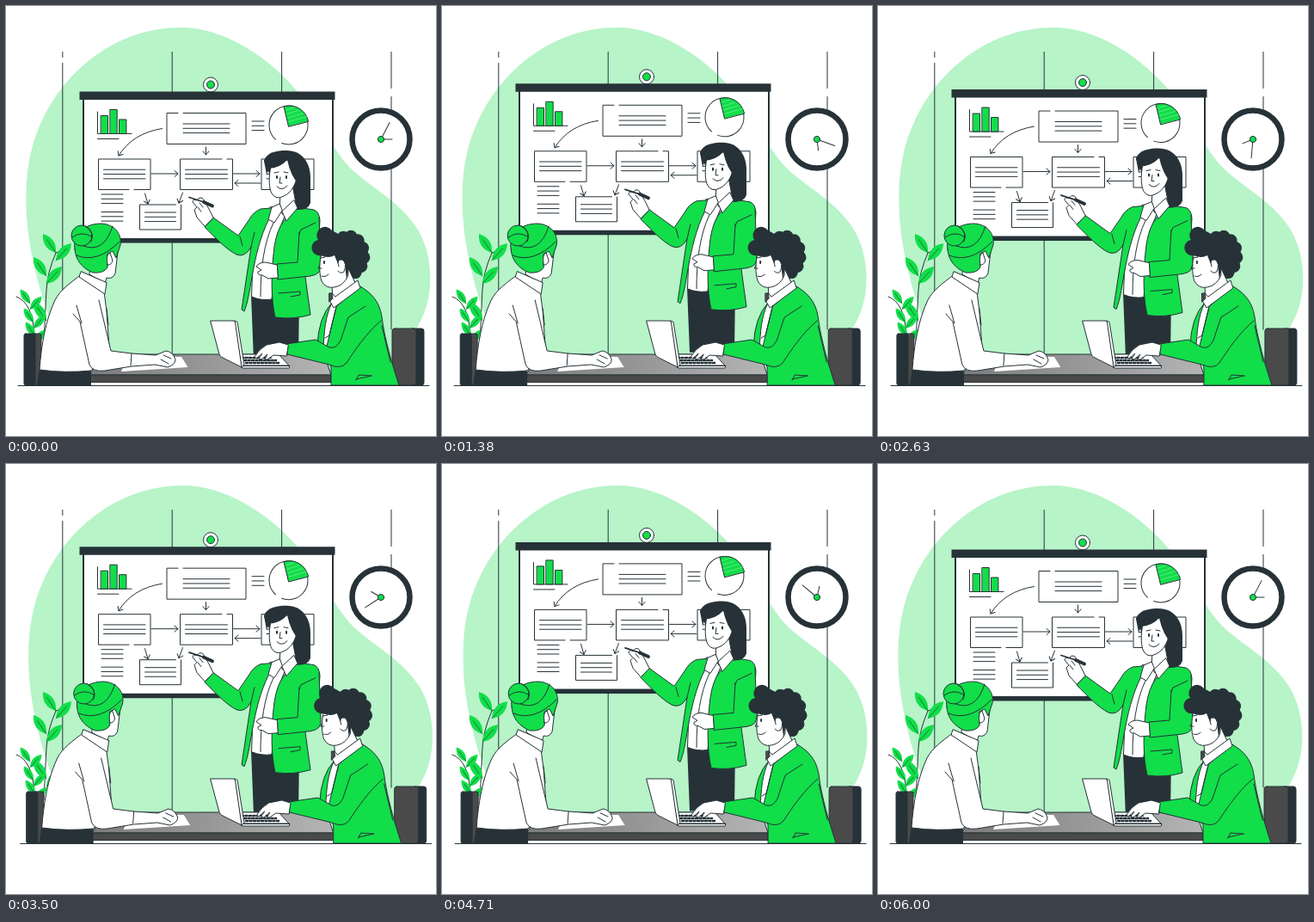
Animation of 500x500 px, one loop 6040 ms. Source, as an HTML page:

```html
<!DOCTYPE html>
<html lang="en">
<head>
<meta charset="utf-8">
<title>Team meeting</title>
<style>
html, body { margin: 0; width: 100%; height: 100%; overflow: hidden; background: #fff; }
svg { display: block; width: 100vw; height: 100vh; fill: none; stroke: #263238; stroke-width: 1; stroke-linejoin: round; stroke-linecap: round; }
.g { fill: #11de49; }
.w { fill: #fff; }
.d { fill: #263238; }
.k { fill: #4a4a4a; }
.n { stroke: none; }
</style>
</head>
<body>
<svg viewBox="0 0 500 500">
  <defs>
    <linearGradient id="top"><stop stop-color="#7c7c7c"/><stop offset="1" stop-color="#b4b4b4"/></linearGradient>
  </defs>

  <path class="sway n" fill="#b7f4c8" d="M203 25C250 25 300 55 335 95C362 127 378 165 400 188C425 212 460 228 480 262C497 292 497 335 484 362C474 385 455 405 440 430H90C60 400 35 330 26 265C20 215 24 170 42 133C70 73 130 25 203 25Z"/>
  <g id="wall"></g>

  <!-- clock -->
  <circle class="w" cx="436" cy="155" r="33.500" stroke-width="6.500"/>
  <path id="hands" d="M436 155L446 135.500M436 155H449"/>
  <circle class="g" cx="436" cy="155" r="3.600"/>

  <g id="float">
    <circle class="w" cx="238" cy="91.500" r="8.500"/>
    <circle class="g" cx="238" cy="91.500" r="4.500"/>
    <rect class="w" x="90" y="105" width="290" height="167" stroke-width="2"/>
    <path class="d n" d="M85.500 99.500H382.500V109H85.500ZM89 270H381V275.500H89Z"/>
    <g id="diagram"></g>

    <!-- presenter -->
    <path class="d n" d="M285 336H341L340 412H288Z"/>
    <path class="w" d="M307 234L296 262L287 298L285.500 338Q297 343 309 341L316 265L328 234Z"/>
    <path d="M311 252C300 275 296 304 296 338"/>
    <path class="g" d="M308 235L296 236Q287 240 283 248L270 267L241 246L231 257C243 269 256 283 268 289Q278 293 285 280L274 353L277 355C286 335 286 280 310 240Z"/>
    <path d="M285 280L289 263M272 268L275 279"/>
    <path class="g" d="M334 231L345 235L358 237Q364 239 365 249L363 285L348 315L354 359Q334 365 313 362C308 340 308 312 312 280Q315 260 323 250Z"/>
    <path d="M317 334L342 332V336L331 338"/>
    <path class="g" d="M341 263L339 298L315 300L316 318L354 314Q367 312 366 301L364 246"/>
    <path d="M341 265L343 260L360 252"/>
    <path class="w" d="M315 301L302 298Q294 298 291 303L297 307L293 309Q292 313 298 313L305 317L316 316Z"/>
    <path class="d n" d="M300 180C303 170 315 168 326 168C345 168 354 183 354 200V229Q351 238 338 237L308 200Z"/>
    <path class="w" d="M319 218L318 235L322 243L337 229L333 208Z"/>
    <path class="w" d="M308 186C305 200 306 213 309 218Q314 226 323 221C332 217 337 207 338 199L328 179Z"/>
    <path class="d n" d="M300 180C306 166 340 166 343 184L341 208Q331 198 327 179Q319 188 306 189L303 196Z"/>
    <path d="M312 194L317 193M323 193L328 194M319 199L318 206H321M315 210Q321 216 327 209"/>
    <path d="M315 198V200M326 198V200" stroke-width="2"/>
    <path class="w" d="M318 230L309 234L305 248L312 252L321 238ZM321 239L326 250L339 235L335 226Z"/>
    <path class="w" d="M231 256L222 246L219 237L222 234L217 228Q217 224 222 226L225 223Q229 222 231 227L236 236L241 246Z"/>
    <path d="M223 234L227 239M225 229L229 234"/>
    <path d="M213 222.500L230 228" stroke-width="1.800"/>
    <path d="M230 228L240 232.500" stroke-width="3.800"/>
  </g>

  <g id="plant"><path d="M58 287Q48 310 47 330T44 390M58 287L66 284M12 338Q32 345 33 386"/></g>

  <g class="sway">
    <!-- left chair, table -->
    <rect class="k" x="30" y="381" width="11" height="60" rx="2"/>
    <rect class="d" x="21" y="381" width="13" height="60" rx="2"/>
    <path fill="url(#top)" d="M112 405H370L378 429H98Z"/>
    <path class="k" d="M98 429H378V437.500H98Z"/>
    <path class="w n" d="M141 408H204L211.500 420L134 425Z"/>

    <!-- seated colleague, left -->
    <path class="d n" d="M39 420H99V441H36Z"/>
    <path class="w" d="M88 312C75 322 63 330 57 342C46 365 41 395 39 423Q68 427 99 424L120 396L117 355L114 332Z"/>
    <path class="w" d="M108 342L122 401L146 404L174 406L186 401Q194 402 197 411Q197 417 188 420L173 417L146 419L115 424Q101 426 97 417L86 367L78 358"/>
    <path d="M146 404L145 418M183 406L192 410M180 411L189 416M82 348L88 369M117 352L119 371"/>
    <path class="w" d="M98 302L97 312L115 323L117 316Q124 318 127 311L130 286L119 275Z"/>
    <path class="w" d="M87 309L85 315L115 335L117 322Z"/>
    <path class="g" d="M80 283C77 264 92 253 111 253C128 254 135 267 133 278L128 293L124 285L118 288V304Q114 311 101 310C89 305 81 296 80 283Z"/>
    <path class="w" d="M118 301Q116 288 121 287L124 296Q122 302 118 301Z"/>
    <circle class="g" cx="88" cy="267" r="12"/>
    <path d="M77 269Q88 261 99 268M92 256Q104 263 99 274M90 279Q114 288 124 256M82 290Q106 300 132 274"/>
  </g>

  <!-- laptop -->
  <path class="w" d="M272 405H317L329 418H276Z"/>
  <path d="M274 409H310M277 412H314M279 415H318" stroke-width="2.500" stroke-dasharray="2 2.500"/>
  <path class="w" d="M274 418.500H330L329 421H275Z"/>
  <path class="w" d="M266 366L269 367.500L277 417L274 420Z"/>
  <path class="w" d="M238 366H264Q266 366 266.500 368L274 420L252 409Q249 408 248 405Z"/>

  <g class="sway">
    <!-- right chair -->
    <rect class="d" x="470" y="375" width="16" height="66" rx="3"/>
    <rect class="k" x="449" y="375" width="28" height="66" rx="3"/>

    <!-- seated colleague, right -->
    <path class="g" d="M379 345Q363 362 362 396L380 403V350Z"/>
    <path class="w" d="M379 345C371 361 370 379 369 399L380 407L409 331Z"/>
    <path class="g" d="M412 326C425 334 434 343 437 361C440 387 449 416 457 441H378V420L371 404L380 366L384 350Z"/>
    <path class="g" d="M436 366C420 379 405 401 396 415Q389 423 376 417L327 405L326 393L360 388L376 397Q384 399 389 389L398 362L418 349"/>
    <path d="M407 435L410 429L425 430M437 372L447 414M407 434L425 430M384 350L376 383L371 386"/>
    <path class="w" d="M328 394L318 391L303 394Q294 399 289 408L291 410L298 404L294 410L297 411L304 405L301 411L304 411L311 406L326 407Z"/>
    <g id="curls" class="d n"><ellipse cx="398" cy="290" rx="23" ry="27"/></g>
    <path class="w" d="M379 323L380 346L409 328L398 305Z"/>
    <path class="w" d="M367 287C364 299 364 311 367 320Q372 329 382 327Q393 325 398 313L397 287Z"/>
    <path class="d n" d="M366 290A8.500 8.500 0 0 1 363 272A8.500 8.500 0 0 1 379 261L405 275L396 318L394 300H386L382 290Q375 294 366 290Z"/>
    <path class="w" d="M387 303Q384 294 391 295Q397 299 393 309Q389 312 386 308"/>
    <path d="M366 293L371 292M365 301L363 305H367M367 314Q371 316 375 312"/>
    <path d="M370 297V299" stroke-width="2"/>
    <path class="w" d="M379 334L376 342L381 351L412 328L409 319L383 338Z"/>
    <path class="k" d="M376 334H379L380 340L376 344Z"/>
    <path d="M14 441.500H492"/>
  </g>
</svg>
<script>
const LOOP = 6040, CYCLE = 6000;
const byId = id => document.getElementById(id);
const add = (id, html) => byId(id).insertAdjacentHTML("beforeend", html);
const line = (d, rest = "") => `<path d="${d}" ${rest}/>`;
const repeat = (n, f) => Array.from({ length: n }, (_, i) => f(i)).join("");

// Wall seams; the outer two are broken near the top.
add("wall", repeat(4, i => {
  const x = 65.8 + 127.4 * i;
  return line(`M${x} 53.5V${[375, 405, 101, 376][i]}`, i % 3 ? "" : `stroke-dasharray="${i ? "42 10" : "6 7"} 400"`);
}));

const rules = (x, y, w) => line(repeat(3, i => `M${x} ${y + 5.3 * i}h${w}`));

// A box with a gap in its outline, starting at gx on the top or bottom edge.
function card(x, y, w, h, gx, side = 1) {
  const [from, to] = side > 0 ? [y, y + h] : [y + h, y];
  const pad = w > 80 ? 19 : 6;
  return line(`M${gx + 6} ${from}H${x + w}V${to}H${x}V${from}H${gx}`) +
    rules(x + pad, y + h / 2 - 5.5, w - 2 * pad);
}

function head(x, y, angle) {
  return line("M-4 -3.5L0 0L-4 3.5", `transform="translate(${x} ${y}) rotate(${angle})"`);
}
function arrow(x, y, tx, ty) {
  return line(`M${x} ${y}L${tx} ${ty}`) + head(tx, ty, Math.atan2(ty - y, tx - x) * 180 / Math.PI);
}

add("diagram", [
  line("M106.5 123V148.500H146M106.500 154.500H131"),
  repeat(3, i => {
    const h = [21, 28, 16.5][i];
    return `<rect class="g" x="${110.5 + 10.7 * i}" y="${148.5 - h}" width="8" height="${h}"/>`;
  }),
  card(187, 124.5, 92, 36, 200),
  card(107.5, 178, 60.5, 35.5, 143, -1),
  card(202.5, 178, 61, 35.5, 251),
  card(297, 178, 61, 35.5, 303),
  card(155.5, 231, 48, 29, 197.5),
  rules(286, 134, 14), rules(111, 219, 25), rules(111, 239.5, 25),
  `<circle cx="328.500" cy="138.500" r="22.500" pathLength="100" stroke-dasharray="94 6" transform="rotate(132 328.500 138.500)"/>`,
  line("M328.5 140L323 117C337 113 349 122 351.500 134Z", 'class="g"'),
  line(repeat(4, i => `M${326 + i} ${121 + 4.5 * i}l${9 + 4 * i} ${-3 - i}`), 'stroke="#8ff0a8" stroke-width=".6"'),
  line("M181.5 142.500Q147 148 131 174"), head(131, 174, 122),
  arrow(232.5, 164, 232.5, 173), arrow(169, 195, 200, 195), arrow(264.5, 195, 295, 195),
  arrow(296, 206, 266, 206), arrow(161.5, 218, 165, 230), arrow(205.5, 217, 201, 229)
].join(""));

function leaf(x, y, dx, dy) {
  return line(`M${x} ${y}q${dx * .5 + dy * .4} ${dy * .5 - dx * .4} ${dx} ${dy}q${-dx * .5 - dy * .4} ${-dy * .5 + dx * .4} ${-dx} ${-dy}`, 'class="g n"') +
    line(`M${x} ${y}l${dx * .7} ${dy * .7}`, 'stroke-width=".6"');
}
// Each knot of a stem bears one leaf to the left and a lower one to the right.
function leaves(size, knots) {
  return knots.map(([x, y]) =>
    leaf(x, y, -15 * size, -22 * size) + leaf(x, y + 9 * size, 18 * size, -20 * size)).join("");
}
add("plant", leaves(1, [[58, 287], [47, 314], [47, 366]]) + leaves(.75, [[28, 346], [32, 368], [34, 384]]));

// Curls along the right-hand rim of the hair.
add("curls", repeat(8, i => {
  const a = -1.9 + i * .5;
  return `<circle cx="${398 + 18 * Math.cos(a)}" cy="${290 + 22 * Math.sin(a)}" r="7.500"/>`;
}));

// Sideways shake grows to the middle of the cycle and dies away again.
const shake = i => [0, -1, 2, -4, 4, -4][Math.min(i, 10 - i)];
const swaying = document.querySelectorAll(".sway");

function draw() {
  const p = Math.min(performance.now() % LOOP, CYCLE) / CYCLE;
  const i = Math.min(Math.floor(p * 10), 9);
  const x = shake(i) + (shake(i + 1) - shake(i)) * (p * 10 - i);
  const lift = 10 * (1 - Math.abs(1 - p * 4 % 2));
  swaying.forEach(g => g.setAttribute("transform", `translate(${x} 0)`));
  byId("float").setAttribute("transform", `translate(0 ${-lift})`);
  byId("hands").setAttribute("transform", `rotate(${p * 360} 436 155)`);
  requestAnimationFrame(draw);
}
draw();
</script>
</body>
</html>
```
